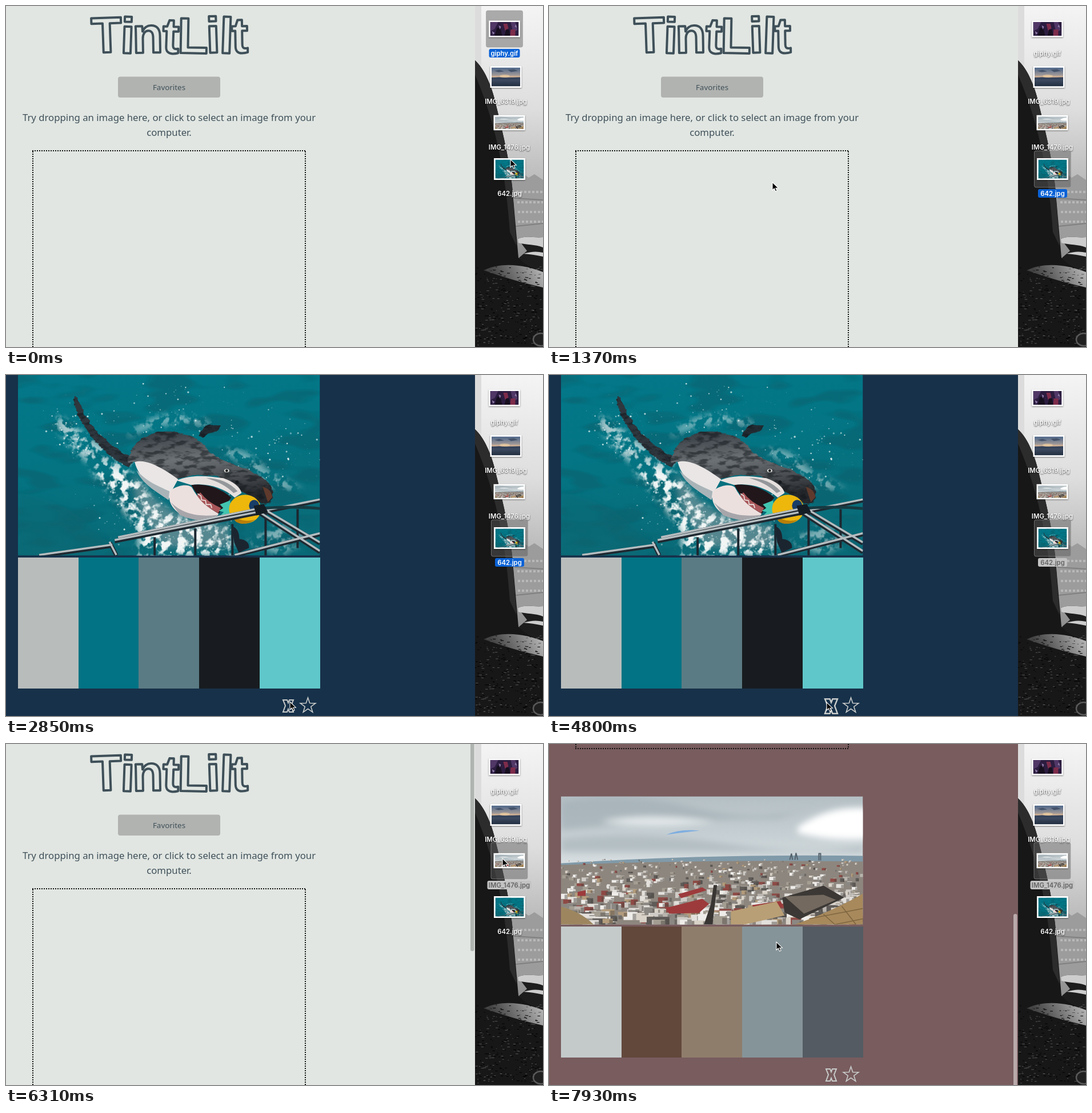
These frames come from a looping animation (940 by 596 pixels, 8 s). An HTML page:

```html
<!DOCTYPE html>
<html lang="en">
<head>
<meta charset="utf-8">
<title>TintLilt</title>
<style>
html, body { margin: 0; width: 100%; height: 100%; overflow: hidden; }
svg { display: block; }
.copy { font-family: "Noto Sans", sans-serif; font-size: 16.75px; fill: #3f5059; text-anchor: middle; }
.title { font: bold 88px "Liberation Sans", Arial, sans-serif; letter-spacing: -2.5px; text-anchor: middle;
  fill: none; stroke: #3f5059; stroke-width: 4; stroke-linejoin: round; }
.name { font: 600 11.3px Inter, sans-serif; fill: #fff; text-anchor: middle; filter: drop-shadow(0 1px 1px #000b); }
.pick { visibility: hidden; }
.blue .pick, .grey .pick { visibility: visible; }
.tag { fill: #0a62d6; }
.grey .tag { fill: #c3c3c3; }
.grey .name { fill: #636363; }
.blue .name, .grey .name { filter: none; }
.dots { fill: none; stroke: #111; stroke-width: 2; stroke-dasharray: 2 2; }
.mark { fill: none; stroke: #c9cccb; }
</style>
</head>
<body>
<svg width="940" height="596" viewBox="0 0 940 596">
<defs>
  <linearGradient id="fog" x2="0" y2="1">
    <stop stop-color="#f4f4f4"/><stop offset=".3" stop-color="#dedede"/>
    <stop offset=".55" stop-color="#b4b4b4"/><stop offset=".75" stop-color="#8c8c8c"/>
  </linearGradient>
  <linearGradient id="gleam" x2="1" y2="-.2">
    <stop stop-color="#3a3a3a"/><stop offset=".5" stop-color="#7a7a7a"/><stop offset="1" stop-color="#c4c4c4"/>
  </linearGradient>
  <linearGradient id="sky" x2="0" y2="1">
    <stop stop-color="#b4bfc4"/><stop offset=".3" stop-color="#c6cfd3"/><stop offset=".5" stop-color="#d5dcdf"/>
  </linearGradient>
  <linearGradient id="dusk" x2="0" y2="1">
    <stop stop-color="#4a6488"/><stop offset=".4" stop-color="#9d9798"/><stop offset=".5" stop-color="#dcb794"/>
    <stop offset=".55" stop-color="#46536a"/><stop offset="1" stop-color="#222e40"/>
  </linearGradient>
  <linearGradient id="sea" x2=".2" y2="1">
    <stop stop-color="#04798a"/><stop offset=".5" stop-color="#037584"/><stop offset="1" stop-color="#0a6b78"/>
  </linearGradient>
  <linearGradient id="hide" x2=".25" y2="1">
    <stop stop-color="#2f363c"/><stop offset=".45" stop-color="#6c7175"/><stop offset=".75" stop-color="#4b4f53"/><stop offset="1" stop-color="#25282c"/>
  </linearGradient>
  <filter id="soft"><feGaussianBlur stdDeviation="6"/></filter>
  <filter id="waves" x="0" y="0" width="1" height="1">
    <feTurbulence type="fractalNoise" baseFrequency=".012 .04" numOctaves="2" seed="4"/>
    <feColorMatrix values="0 0 0 0 0 0 0 0 0 0 0 0 0 0 0 6 0 0 0 -2.9" result="n"/>
    <feComposite in="SourceGraphic" in2="n" operator="in"/>
  </filter>
  <filter id="foam">
    <feTurbulence type="fractalNoise" baseFrequency=".07" numOctaves="3" seed="2"/>
    <feColorMatrix values="0 0 0 0 0 0 0 0 0 0 0 0 0 0 0 6 0 0 0 -2.7" result="n"/>
    <feGaussianBlur in="SourceGraphic" stdDeviation="6"/>
    <feComposite in2="n" operator="in"/>
  </filter>
  <filter id="skin" color-interpolation-filters="sRGB">
    <feTurbulence type="fractalNoise" baseFrequency=".05 .12" numOctaves="3" seed="7" result="n"/>
    <feDisplacementMap in="SourceGraphic" in2="n" scale="7" xChannelSelector="R" yChannelSelector="G" result="shape"/>
    <feColorMatrix in="n" values="0 0 0 0 .05 0 0 0 0 .07 0 0 0 0 .09 5 0 0 0 -2.3"/>
    <feComposite in2="shape" operator="in" result="shade"/>
    <feComponentTransfer><feFuncA type="linear" slope=".5"/></feComponentTransfer>
    <feMerge><feMergeNode in="shape"/><feMergeNode/></feMerge>
  </filter>

  <symbol id="shark" viewBox="21 -37 528 352" preserveAspectRatio="none">
    <rect x="21" y="-37" width="528" height="352" fill="url(#sea)"/>
    <rect x="21" y="-37" width="528" height="352" fill="#0b5c68" opacity=".45" filter="url(#waves)"/>
    <path d="M21 205C70 215 120 230 170 285L150 315H21Z" fill="#0b6671" opacity=".4" filter="url(#soft)"/>
    <path d="M225 170C250 215 300 260 390 262V300H280C250 270 215 220 225 170Z" fill="#6e9299" opacity=".75" filter="url(#soft)"/>
    <g filter="url(#foam)" fill="#f1f6f5">
      <path d="M148 165C190 155 225 165 240 195C265 245 330 262 395 265V315H225C250 285 210 235 148 165Z"/>
      <path d="M85 70C110 75 150 120 225 155L180 175C130 150 90 110 85 70Z" opacity=".7"/>
      <path d="M210 110C240 55 350 60 365 95C300 75 250 90 210 110Z" opacity=".5"/>
      <path d="M370 130Q420 120 455 165L520 200H470Q440 165 370 130ZM420 290l60-30 50 25-50 30Z" opacity=".5"/>
    </g>
    <g id="spray" fill="#e8f4f3"></g>
    <g filter="url(#skin)">
      <path d="M119 36C130 44 131 60 143 77C162 106 190 130 224 146L215 161C184 148 158 120 141 95C127 74 116 50 119 36Z" fill="#2f373e"/>
      <path d="M337 106C340 94 352 86 375 88C374 96 358 98 347 110Z" fill="#232c33"/>
      <path d="M213 153C216 122 238 103 272 99C312 96 334 108 350 127C366 147 405 155 441 175C463 187 469 200 466 215C462 226 452 228 440 222C420 208 402 192 374 179C340 168 318 180 296 183C270 160 240 150 213 153Z" fill="url(#hide)"/>
    </g>
    <path d="M225 152C245 145 275 163 301 182L290 202L284 218C262 202 234 185 225 152Z" fill="#e9e6e5"/>
    <path d="M228 166C245 185 262 192 286 203L284 218C262 203 238 190 228 166Z" fill="#a9b4b8"/>
    <path d="M298 184C325 173 350 176 380 180C398 186 410 196 412 206L400 214C380 196 350 188 324 192Z" fill="#e6e1df"/>
    <path d="M350 180Q385 180 405 203L398 206Q380 188 350 180Z" fill="#94979a"/>
    <path d="M324 192C347 188 376 197 394 214L371 243C352 231 336 214 324 192Z" fill="#21161a"/>
    <path d="M290 200C302 192 318 190 325 196C335 216 353 232 372 242C366 254 330 256 304 242C288 232 280 214 290 200Z" fill="#ece0de"/>
    <path d="M288 222C310 244 340 248 370 244C355 258 325 254 304 244Z" fill="#a7a6aa"/>
    <path d="M334 210Q345 228 371 241L376 232Q352 222 340 205Z" fill="#a9575a"/>
    <path d="M335 207l6 4 1 7 7 1 1 7 8 0 2 6" fill="none" stroke="#ece7e2" stroke-width="1.6"/>
    <ellipse cx="386" cy="167" rx="4.5" ry="3" fill="#d7d7d4"/><circle cx="386" cy="167" r="2.2" fill="#101417"/>
    <circle cx="404" cy="187" r="3" fill="#15191d"/>
    <path d="M449 195q15 4 17 18l-8 9Z" fill="#5f3a2c"/>
    <path d="M374 226l18-7 3 25-20 1 6-6-9-2 8-5Z" fill="#42c4b0"/>
    <ellipse cx="418" cy="234" rx="28" ry="25" fill="#eeb70c"/>
    <path d="M391 240q20 20 45 12q-18 13-34 4Z" fill="#b87f0a"/>
    <ellipse cx="434" cy="228" rx="9" ry="10" fill="#183d67"/>
    <path d="M396 264q12 4 12 22q18 2 17 16l-18 8-8-18Z" fill="#1b2530"/>
    <g fill="none" stroke-linejoin="round">
      <path d="M260 283V315M331 268V315M396 260V315M454 238V315M510 234V302" stroke="#1c2730" stroke-width="4"/>
      <path d="M58 316L186 298M182 293L193 315M190 290L440 241L549 219M196 285L436 236M400 315L549 278M440 239L549 309M455 238L549 294" stroke="#1f2931" stroke-width="7"/>
      <path d="M58 314L186 296M181 291L193 314M190 288L440 239L549 217M196 283L436 234M400 314L549 276M440 237L549 307M455 236L549 292" stroke="#b5bdc0" stroke-width="3.5"/>
      <path d="M440 233Q500 228 549 233" stroke="#173a42" stroke-width="5"/>
    </g>
    <path d="M433 228l18-3 7 14-20 6Z" fill="#151d24"/>
  </symbol>

  <symbol id="town" viewBox="21 91 528 224" preserveAspectRatio="none">
    <rect x="21" y="91" width="528" height="224" fill="url(#sky)"/>
    <g filter="url(#soft)">
      <path d="M21 100Q130 80 250 110T470 108L400 130Q220 130 21 150Z" fill="#a3afb6" opacity=".7"/>
      <path d="M21 165Q150 150 300 172T549 178V188H21Z" fill="#aeb9bf" opacity=".8"/>
      <path d="M435 145Q490 105 560 112V165Q490 170 435 155Z" fill="#fff"/>
      <path d="M90 135Q170 118 290 135Q190 150 90 135Z" fill="#e3e8ea"/>
    </g>
    <path d="M205 158Q230 147 263 151Q235 154 205 158Z" fill="#7faee0"/>
    <path d="M21 208Q280 191 549 195V212H21Z" fill="#809aa9"/>
    <path d="M21 211Q280 201 549 205V315H21Z" fill="#8d867e"/>
    <path d="M421 202l3-11 2 11M430 202l2-12 3 12M472 203v-12h3v12" stroke="#55636d" fill="none" stroke-width="2"/>
    <g id="houses"></g>
    <path d="M205 286L268 270L280 279L262 295L210 296ZM226 262l42-12 8 5-45 14ZM50 258l14-3v10h-14ZM355 281l50-7 5 10-48 5Z" fill="#9d3b3c"/>
    <path d="M288 246L294 246L286 315H271L283 280Z" fill="#383533"/>
    <path d="M318 292l80-17 14 24-70 16h-24Z" fill="#b99f75"/>
    <path d="M408 268L480 247L516 268L438 306L412 294Z" fill="#3b3835"/>
    <path d="M412 266L480 263L502 272L446 296Z" fill="#73695f"/>
    <path d="M21 284Q55 292 78 315H21Z" fill="#9d865f"/>
    <path d="M430 315Q500 290 549 261V315Z" fill="#a7895c"/>
    <path d="M455 305l94-18M480 297l20 18M512 283l25 32M500 315l49-10" stroke="#7e653f" fill="none" stroke-width="1.5"/>
  </symbol>

  <symbol id="stage" viewBox="0 0 50 24" preserveAspectRatio="none">
    <path d="M0 0H50V24H0Z" fill="#2c1d40"/>
    <path d="M0 0H14L8 12 0 16ZM36 0h8l4 14-8 4Z" fill="#503766"/>
    <path d="M23 3h7l2 8-6 4ZM36 13h8v11h-9Z" fill="#7d2c4a"/>
    <path d="M8 24l4-14 6 1 3 13ZM25 24l3-11h5l2 11Z" fill="#17101f"/>
    <path d="M15 6l4 2-2 5ZM3 16l5 3-3 3ZM45 4l2 6-4-2Z" fill="#8d7aa6"/>
  </symbol>
  <symbol id="sunset" viewBox="0 0 50 33" preserveAspectRatio="none">
    <path d="M0 0H50V33H0Z" fill="url(#dusk)"/>
    <path d="M5 6l9-2 8 3-10 1ZM28 4l11-1 7 3-12 2Z" fill="#44526a"/>
    <path d="M0 18l13-1 12 1 25-1v4H0Z" fill="#34425a"/>
    <ellipse cx="23" cy="15" rx="9" ry="2.5" fill="#f0cfa0" opacity=".7"/>
  </symbol>
</defs>

<rect id="back" width="821" height="596"/>
<g id="home">
  <text class="title" x="286" y="82" rotate="-2 2 -1 2 1 -2 2 -1">TintLilt</text>
  <rect x="196" y="123.5" width="179" height="36.5" rx="4" fill="#b1b3b0"/>
  <text class="copy" x="285.5" y="146.5" style="font-size:13.4px">Favorites</text>
  <text class="copy" x="285.5" y="201">Try dropping an image here, or click to select an image from your</text>
  <text class="copy" x="285.5" y="227">computer.</text>
  <path class="dots" d="M46 253H525M47 254V596M524 254V596"/>
</g>
<g id="result">
  <g id="sharkView"><use href="#shark" x="21" y="-37" width="528.5" height="352.5"/></g>
  <g id="townView">
    <use href="#town" x="21" y="91.5" width="528.5" height="224"/>
    <path class="dots" d="M46 8H525M47 0V8M524 0V8"/>
  </g>
  <g id="bars" shape-rendering="crispEdges"></g>
  <path id="cross" class="mark" stroke-width="2" d="M485 568h7l2 5 2-5h7l-4 10 4 11h-7l-2-5-2 5h-7l4-11Z"/>
  <path id="star" class="mark" stroke-width="1.6"/>
</g>
<rect id="scroll" x="813" width="6.5" rx="3"/>

<g id="wall">
  <rect x="821" width="119" height="596" fill="url(#fog)"/>
  <path d="M821 0h11v105l-11-10Z" fill="#dcdcdc"/>
  <path d="M885 305l18-13 12 8 10-6 15 10v100h-50Z" fill="#9c9c9c"/>
  <path d="M893 325h47M895 343h45M896 360h44M896 377h44" stroke="#b8b8b8" stroke-width="4" stroke-dasharray="4 3"/>
  <path d="M890 336l50 3M892 385l48-5" stroke="#808080" stroke-width="2"/>
  <path d="M821 95C836 108 850 138 857 170C868 215 880 262 886 315L897 440L940 462V596H821Z" fill="#171717"/>
  <path d="M821 95C836 108 850 138 857 170C868 215 880 262 886 315L894 420L882 395C876 310 862 215 821 120Z" fill="#2c2c2c"/>
  <path d="M896 407C912 400 925 406 940 404V462C922 460 907 452 898 440L912 428Z" fill="#1d1d1d"/>
  <path d="M896 407C912 400 925 406 940 404V422C925 416 912 418 897 414ZM906 433q18-6 34-2v7q-18-4-34-5Z" fill="#cdcdcd"/>
  <path d="M836 462C868 446 910 453 940 465V492C905 484 868 473 836 462Z" fill="url(#gleam)"/>
  <g id="grain"></g>
  <ellipse cx="936" cy="583" rx="13" ry="11" fill="#202020" stroke="#5a5a5a" stroke-width="2.5"/>
</g>
<g id="icons"></g>
<use id="ghost" opacity=".6"/>
<path id="cursor" d="M0 0V14L3.3 11 5.6 16 8 15 5.8 10.2H10.3Z" fill="#000" stroke="#fff" stroke-width="1.1"/>
</svg>
<script>
const $ = id => document.getElementById(id);
let seed = 11;
const rnd = () => (seed = seed * 16807 % 2147483647) / 2147483647;
const repeat = (n, make) => Array.from({ length: n }, (_, i) => make(i)).join('');
const bell = () => rnd() + rnd() + rnd() - 1.5;

// x, y, spread of each patch of spray
const patches = [[125, 95, 45], [215, 205, 60], [270, 265, 65], [350, 290, 50], [290, 80, 75], [455, 130, 70]];
$('spray').innerHTML = repeat(700, i => {
  const [x, y, spread] = patches[i % 6];
  return `<circle cx="${x + bell() * spread * 1.3}" cy="${y + bell() * spread}" r="${.3 + rnd() ** 3 * 1.5}" opacity="${.3 + rnd() * .6}"/>`;
});

const walls = ['#e3e0dc', '#cfcbc6', '#b9b4ae', '#d8d2c8', '#8b8782', '#a39d92', '#efedea', '#5f5b58', '#b39c7c', '#8e4a45'];
$('houses').innerHTML = repeat(620, i => {
  const depth = i / 620, size = 3 + depth * 16;
  const x = 15 + rnd() * 530, y = 203 + depth * 106 - rnd() * 4;
  const w = size * (.5 + rnd()), h = size * (.4 + rnd() * .5);
  return `<rect x="${x}" y="${y}" width="${w}" height="${h}" fill="${walls[rnd() * 10 | 0]}"/>
    <path d="M${x + w * .65} ${y + h * .2}h${w * .35}v${h * .8}h${-w * .35}Z" fill="#4b4642" opacity=".45"/>`;
});

$('grain').innerHTML = repeat(320, () => {
  const y = 455 + rnd() * 138;
  return `<rect x="${821 + rnd() * 115}" y="${y}" width="${1 + rnd() * 4}" height="1" fill="${rnd() < .5 ? '#000' : '#555'}"/>`;
});

const pages = {
  home: { back: '#e1e6e2' },
  shark: { back: '#17314a', bars: ['#b8bcbb', '#027384', '#5b7b84', '#181c20', '#5fc7ca'] },
  town: { back: '#785c5e', bars: ['#c4caca', '#62483b', '#8f7d6b', '#859499', '#545b63'] }
};
$('bars').innerHTML = repeat(5, i => `<rect x="${21 + i * 105.7}" y="319" width="105.7" height="228.5"/>`);

$('star').setAttribute('d', 'M' + Array.from({ length: 10 }, (_, i) => {
  const r = i % 2 ? 5.5 : 14, a = i * Math.PI / 5;
  return [528.5 + r * Math.sin(a), 578 - r * Math.cos(a)];
}).join('L') + 'Z');

// name, picture, centre, picture height, label width
const files = [
  ['giphy.gif', 'stage', 872.5, 40, 24, 54],
  ['IMG_6319.jpg', 'sunset', 875, 124, 33, 77],
  ['IMG_1476.jpg', 'town', 881, 204, 21.5, 77],
  ['642.jpg', 'shark', 881.5, 285, 33, 51]
];
$('icons').innerHTML = files.map(([name, pic, x, y, h, w]) => `<g id="${pic}Icon">
  <rect class="pick" x="${x - 32}" y="${y - 32}" width="64" height="64" rx="3" fill="#5a5a5a" fill-opacity=".48" stroke="#999" stroke-opacity=".6"/>
  <rect class="pick tag" x="${x - w / 2}" y="${y + 35}" width="${w}" height="15" rx="3"/>
  <g id="${pic}File">
    <rect x="${x - 27.5}" y="${y - h / 2 - 2.5}" width="55" height="${h + 5}" fill="#fff" style="filter:drop-shadow(0 1px 1px #0007)"/>
    <use href="#${pic}" x="${x - 25}" y="${y - h / 2}" width="50" height="${h}"/>
    <text class="name" x="${x}" y="${y + 47}">${name}</text>
  </g></g>`).join('');

// first step, last step, number of steps, end point
const moves = [
  [140, 140, 1, 889, 279],
  [295, 1070, 6, 391, 308],
  [2410, 2850, 4, 497, 571],
  [3000, 3300, 3, 490, 572],
  [4500, 4650, 2, 486, 572],
  [5240, 6160, 7, 869, 200],
  [6460, 7340, 7, 398, 346]
];
const ease = p => p * p * (3 - 2 * p);

function pointer(t) {
  let x = 883, y = 268;
  for (const [from, to, n, endX, endY] of moves) {
    if (t < from) break;
    const step = n > 1 ? Math.floor((t - from) / (to - from) * (n - 1) + 1e-6) + 1 : 1;
    const p = ease(Math.min(1, step / n));
    x += (endX - x) * p;
    y += (endY - y) * p;
  }
  return [x, y];
}

const show = (id, on) => $(id).setAttribute('visibility', on ? 'visible' : 'hidden');
const within = (t, a, b) => t >= a && t < b;

function draw(t) {
  const name = within(t, 1970, 4940) ? 'shark' : t >= 7930 ? 'town' : 'home';
  const page = pages[name], home = name === 'home';
  $('back').setAttribute('fill', page.back);
  show('home', home);
  show('result', !home);
  show('sharkView', name === 'shark');
  show('townView', name === 'town');
  if (page.bars) page.bars.forEach((c, i) => $('bars').children[i].setAttribute('fill', c));
  $('cross').setAttribute('transform', within(t, 3000, 4940) ? 'translate(494 579) scale(1.22) translate(-494 -578.5)' : '');

  show('scroll', within(t, 1970, 2410) || within(t, 4940, 6460) || t >= 7930);
  $('scroll').setAttribute('y', home ? -4 : 297);
  $('scroll').setAttribute('height', home ? 366 : 303);
  $('scroll').setAttribute('fill', home ? '#b0b4b1' : name === 'town' ? '#b9a9aa' : '#8b98a4');

  const picked = t < 140 ? 'stage' : t < 6310 ? 'shark' : 'town';
  for (const [, pic] of files)
    $(pic + 'Icon').setAttribute('class', pic !== picked ? '' : t < 3750 ? 'blue' : 'grey');

  const [x, y] = pointer(t);
  $('cursor').setAttribute('transform', `translate(${x} ${y})`);
  const first = within(t, 295, 1370);
  show('ghost', first || within(t, 6460, 7490));
  $('ghost').setAttribute('href', first ? '#sharkFile' : '#townFile');
  $('ghost').setAttribute('transform', first ? `translate(${x - 889} ${y - 279})` : `translate(${x - 869} ${y - 200})`);
}

const start = performance.now();
function tick() {
  draw((performance.now() - start) % 8000);
  requestAnimationFrame(tick);
}
tick();
</script>
</body>
</html>
```
